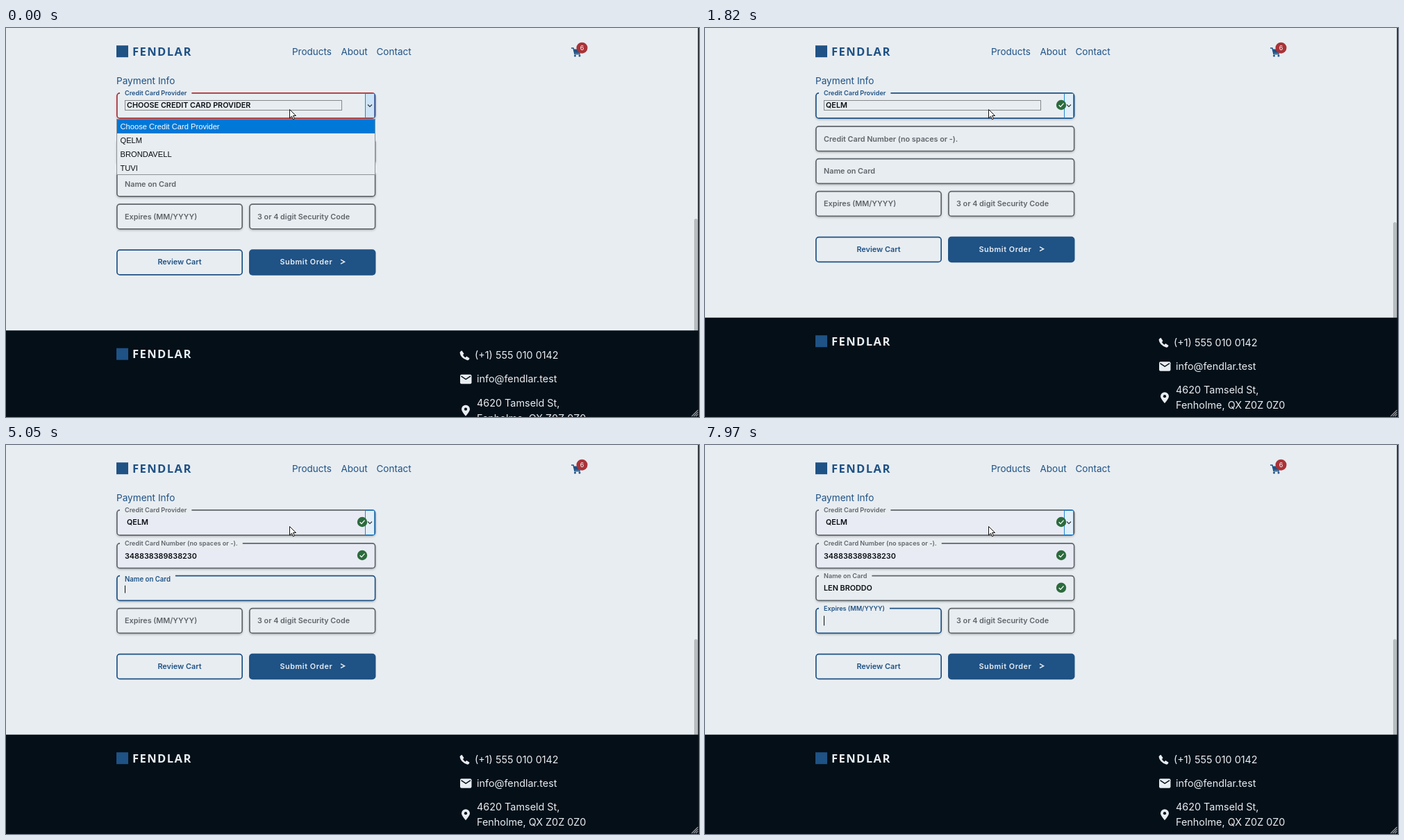
Write an HTML page with a canvas that moves like this. It is 998x561 px and loops after 8000 ms.

```html
<!DOCTYPE html>
<html lang="en">
<head>
<meta charset="utf-8">
<title>Checkout form</title>
<style>
html, body { margin: 0; width: 100%; height: 100%; overflow: hidden; background: #e8edf1; }
canvas { display: block; width: 998px; height: 561px; }
</style>
</head>
<body>
<canvas id="stage" width="998" height="561"></canvas>
<script>
const ctx = document.getElementById('stage').getContext('2d');
const LOOP = 8000;
const SANS = 'Inter, Roboto, sans-serif';
const ARIAL = '"Liberation Sans", sans-serif';
const BRAND_FONT = '"Noto Sans", sans-serif';

const PAGE = '#e8edf1', TINT = '#e8ebf3', DARK = '#040f18', INK = '#0a0f14';
const BLUE = [31, 82, 133], GRAY = [95, 101, 107], RED = [172, 48, 54];
const rgb = c => `rgb(${c.map(Math.round)})`;
const NAVY = rgb(BLUE);
const BORDER = 1.7, FIELD_H = 37.5;

const lerp = (a, b, k) => a + (b - a) * k;
const mix = (a, b, k) => a.map((v, i) => lerp(v, b[i], k));
const ramp = (t, start, span) => Math.min(1, Math.max(0, (t - start) / span));

// CSS "ease" curve, solved by bisection
function ease(x) {
  const bez = (a, b, s) => 3 * a * s * (1 - s) ** 2 + 3 * b * s * s * (1 - s) + s ** 3;
  let lo = 0, hi = 1;
  for (let i = 0; i < 20; i++) {
    const mid = (lo + hi) / 2;
    if (bez(.25, .25, mid) < x) lo = mid; else hi = mid;
  }
  return bez(.1, 1, lo);
}
const glide = (t, start, span) => ease(ramp(t, start, span));

function text(str, x, cy, size, color, { weight = 400, font = SANS, align = 'left', spacing = 0 } = {}) {
  ctx.font = `${weight} ${size}px ${font}`;
  ctx.letterSpacing = spacing + 'px';
  ctx.textAlign = align;
  ctx.fillStyle = color;
  ctx.fillText(str, x, cy + size * .36);
  const width = ctx.measureText(str).width;
  ctx.letterSpacing = '0px';
  return width;
}

function rect(x, y, w, h, color) {
  ctx.fillStyle = color;
  ctx.fillRect(x, y, w, h);
}

function box(x, y, w, h, r, color) {
  ctx.beginPath();
  ctx.roundRect(x, y, w, h, r);
  ctx.fillStyle = color;
  ctx.fill();
}

function outline(x, y, w, h, color) {
  const inset = BORDER / 2;
  ctx.beginPath();
  ctx.roundRect(x + inset, y + inset, w - BORDER, h - BORDER, 4.2);
  ctx.strokeStyle = color;
  ctx.lineWidth = BORDER;
  ctx.stroke();
}

function disc(x, y, r, color) {
  ctx.beginPath();
  ctx.arc(x, y, r, 0, Math.PI * 2);
  ctx.fillStyle = color;
  ctx.fill();
}

function shape(path, x, y, fill, stroke, width = 1) {
  const p = new Path2D(path);
  ctx.save();
  ctx.translate(x, y);
  if (fill) { ctx.fillStyle = fill; ctx.fill(p); }
  if (stroke) { ctx.strokeStyle = stroke; ctx.lineWidth = width; ctx.stroke(p); }
  ctx.restore();
}

function check(y, alpha) {
  if (!alpha) return;
  ctx.globalAlpha = alpha;
  disc(513, y, 7.2, '#2b6b3c');
  shape('M-3.3 .2L-1 2.6L3.5 -2.4', 513, y, null, '#fff', 1.3);
  ctx.globalAlpha = 1;
}

function caret(x, cy) {
  rect(Math.round(x), cy - 7, 1, 14, INK);
}

function frame(x, y, w, border, fill = PAGE, h = FIELD_H) {
  ctx.save();
  ctx.shadowColor = 'rgba(0,0,0,.2)';
  ctx.shadowBlur = 3;
  ctx.shadowOffsetY = 1.5;
  box(x, y, w, h, 5, fill);
  ctx.restore();
  outline(x, y, w, h, border);
}

function label(str, x, y, lift, color) {
  const size = lerp(10.8, 9.1, lift);
  const cy = lerp(y + 18.7, y + .5, lift);
  if (lift) {
    ctx.font = `600 ${size}px ${SANS}`;
    rect(x + 5, cy - size * .75, ctx.measureText(str).width + 14, size * 1.65, PAGE);
  }
  text(str, x + 12, cy, size, color, { weight: 600 });
}

// focus: [gained, lost], lift: moment the label starts to float
function field(t, { x, y, w, name, focus = [1e9, 1e9], lift = 1e9, value = '', valid = 1e9, tint = 1e9, showCaret }) {
  const k = ramp(t, focus[0], 150) * (1 - ramp(t, focus[1], 200));
  const color = rgb(mix(GRAY, BLUE, k));
  frame(x, y, w, color, t >= tint ? TINT : PAGE);
  const width = value ? text(value, x + 12, y + 18.7, 10.8, INK, { weight: 600 }) : 0;
  check(y + 18, ramp(t, valid, 300));
  if (showCaret && t >= focus[0] && t < focus[1]) caret(x + 12 + width, y + 18.7);
  label(name, x, y, glide(t, lift, 200), color);
}

const PROVIDERS = ['Choose Credit Card Provider', 'QELM', 'BRONDAVELL', 'TUVI'];

function providerSelect(t) {
  const focused = 1 - ramp(t, 2820, 200);
  const accent = mix(GRAY, BLUE, focused);
  const border = t < 2820 ? mix(RED, BLUE, glide(t, 410, 300)) : accent;
  frame(159, 93, 373.5, rgb(border), t >= 3060 ? TINT : PAGE, 38);
  const value = t < 410 ? PROVIDERS[0].toUpperCase() : PROVIDERS[1];
  text(value, 174, 111.5, 10.8, INK, { weight: 600 });
  if (t < 2820) {
    ctx.setLineDash([1, 1]);
    ctx.lineWidth = 1;
    ctx.strokeStyle = '#222';
    ctx.strokeRect(171.5, 104.5, 312, 14);
    ctx.setLineDash([]);
  }
  rect(518, 94.5, 13, 35, t < 410 ? '#cce4f7' : '#e2eff9');
  ctx.lineWidth = 1;
  ctx.strokeStyle = '#2787d3';
  ctx.strokeRect(517.5, 94.5, 13, 35);
  shape('M-3 -1.5L0 1.5L3 -1.5', 524, 112, null, '#333', 1.1);
  check(111, ramp(t, 410, 300));
  label('Credit Card Provider', 159, 93, 1, rgb(accent));
}

function providerList(t) {
  rect(159, 131, 373, 81, '#8d9296');
  rect(160, 132, 371, 79, PAGE);
  const active = t < 410 ? 0 : 1;
  rect(160, 132 + active * 20, 371, 20, '#0078d7');
  PROVIDERS.forEach((name, i) =>
    text(name, 164.5, 142 + i * 20, 11.15, i === active ? '#fff' : INK, { font: ARIAL }));
}

function brand(y, color) {
  rect(159, y - 8.5, 17, 17, NAVY);
  text('FENDLAR', 182, y, 16.6, color, { weight: 800, font: BRAND_FONT, spacing: 1.4 });
}

function header() {
  brand(33.7, NAVY);
  text('Products', 412, 34.5, 13.5, NAVY);
  text('About', 482.5, 34.5, 13.5, NAVY);
  text('Contact', 533.5, 34.5, 13.5, NAVY);
  shape('M0 0H3L5 8.5H13', 814, 29, null, NAVY, 1.5);
  shape('M3 1.5H15L13 7.5H5Z', 814, 29, NAVY);
  disc(819.5, 40, 1.5, NAVY);
  disc(826, 40, 1.5, NAVY);
  disc(829.5, 28.7, 8, '#a93338');
  text('6', 829.5, 28.7, 9, '#fff', { align: 'center' });
  text('Payment Info', 159, 75.8, 13.6, NAVY);
}

function buttons(y) {
  outline(159, y, 182, FIELD_H, NAVY);
  text('Review Cart', 250, y + 18.3, 10.9, NAVY, { weight: 600, align: 'center' });
  box(350, y, 182.5, FIELD_H, 5, NAVY);
  text('Submit Order', 394.5, y + 18.3, 10.8, PAGE, { weight: 600, spacing: .55 });
  shape('M0 -3L5.5 0L0 3', 482, y + 18, null, PAGE, 1.5);
}

function footer(top) {
  rect(0, top, 998, 561, DARK);
  ctx.save();
  ctx.translate(0, top);
  brand(34, PAGE);
  shape('M3 0L6 4.5L4.5 6.2Q6 9 8 10L9.8 8.4L14 11Q13.5 14 11 14Q1 11 0 2.8Q1 .5 3 0Z', 653.5, 29, PAGE);
  text('(+1) 555 010 0142', 675, 36, 14.4, PAGE);
  box(654, 63.5, 16.5, 13.5, 2, PAGE);
  shape('M1.5 2.5L8.2 7L15 2.5', 654, 63.5, null, DARK, 1.4);
  text('info@fendlar.test', 678, 70, 14.4, PAGE);
  shape('M0 16Q-6 9 -6 6A6 6 0 0 1 6 6Q6 9 0 16Z', 662, 107.5, PAGE);
  disc(662, 113.5, 2.1, DARK);
  text('4620 Tamseld St,', 678, 104.3, 14.4, PAGE);
  text('Fenholme, QX Z0Z 0Z0', 678, 126.3, 14.4, PAGE);
  ctx.restore();
}

const CARD_NAME = 'LEN BRODDO';
// [time, number of letters shown]
const KEYS = [[5380, 1], [5560, 2], [5760, 3], [5960, 4], [6260, 5], [6440, 4],
  [6560, 5], [6680, 6], [6840, 7], [7020, 8], [7110, 9], [7200, 10]];

function typedName(t) {
  const count = KEYS.reduce((n, [at, len]) => t >= at ? len : n, 0);
  return CARD_NAME.slice(0, count);
}

function draw(t) {
  rect(0, 0, 998, 561, PAGE);
  // the error line under the select collapses and pulls the page up
  const drop = Math.min(18.5, 126 * (1 - glide(t, 410, 300)));
  header();
  field(t, {
    x: 159, y: 141 + drop, w: 373.5, name: 'Credit Card Number (no spaces or -).',
    focus: [2820, 4840], lift: 2860, valid: 4050, tint: 4840,
    value: t >= 4050 ? '348838389838230' : '',
    showCaret: t < 3310 || t >= 3810
  });
  field(t, {
    x: 159, y: 187.8 + drop, w: 373.5, name: 'Name on Card',
    focus: [4840, 7720], lift: 4970, valid: 5380,
    value: typedName(t), showCaret: t < 7480
  });
  field(t, {
    x: 159, y: 234.7 + drop, w: 182, name: 'Expires (MM/YYYY)',
    focus: [7720, 1e9], lift: 7800, showCaret: true
  });
  field(t, { x: 350, y: 234.7 + drop, w: 182.5, name: '3 or 4 digit Security Code' });
  buttons(300.7 + drop);
  providerSelect(t);
  if (t < 1820) providerList(t);

  box(991, 280 - drop * .27, 5, 300, 2.5, '#b8bdc1');
  footer(417.7 + drop);
  rect(996.5, 0, 1.5, 561, '#10161c');
  shape('M0 9L9 0M3 9L9 3M6 9L9 6', 987.5, 551, null, '#9a9ea2', 1.2);
  shape('M0 0V12.5L3 9.7L5 14.3L7 13.4L5.1 9H9Z', 408.5, 117.5, '#fff', '#111', 1);
}

function tick() {
  draw(performance.now() % LOOP);
  requestAnimationFrame(tick);
}
tick();
</script>
</body>
</html>
```
